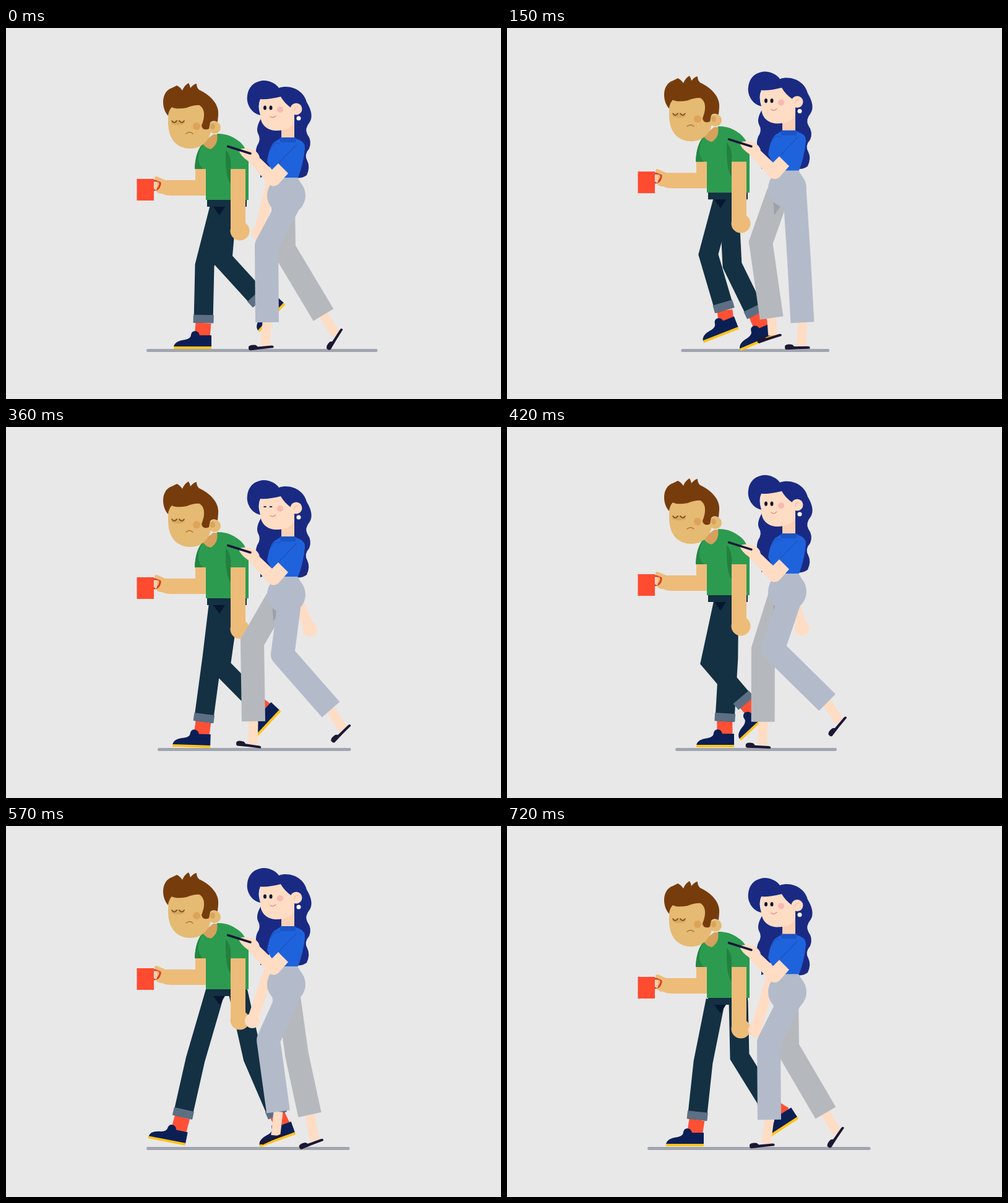
Animation of 800x600 px, one loop 0.75 s. Source, as an HTML page with a canvas:

```html
<!DOCTYPE html>
<html lang="en">
<head>
<meta charset="utf-8">
<title>Walking couple</title>
<style>
html, body { margin: 0; width: 100%; height: 100%; overflow: hidden; background: #e8e8e8; }
canvas { display: block; }
</style>
</head>
<body>
<canvas id="stage" width="800" height="600"></canvas>
<script>
const ctx = document.getElementById('stage').getContext('2d');
const LOOP = 750, STEP = 30;
const TIMES = [0, 60, 120, 240, 360, 480, 570, 720];

// Body tracks, one row per key time: man bob, woman bob, hair bob, ground left, ground right, hand x, hand y
const body = [
  [0, 0, 0, 228, 600, 409, 331],
  [-8, -8, -11, 241, 570, 428, 326],
  [-12, -11.5, -15, 290, 515, 455, 322],
  [-10, -11, -10, 241, 553, 492, 315],
  [-1, 0, 1, 246, 557, 491, 327],
  [-12, -11.5, -16, 298, 508, 450, 322],
  [-14, -15, -17, 228, 555, 398, 315],
  [0, -2.5, -1, 228, 587, 402, 330]
];

// Leg tracks: hip x, knee x, knee y, cuff x, cuff y, sole x, sole y, foot angle
const manNear = [
  [347, 321, 384, 319, 477, 302, 519, 0],
  [343, 350, 385, 370, 470, 365, 516, -14],
  [355, 360, 384, 391, 467, 391, 513, -19],
  [364, 372, 383, 431, 450, 442, 497, -38],
  [362, 347, 387, 405, 446, 424, 482, -47],
  [340, 314, 371, 361, 449, 364, 494, -33],
  [338, 306, 378, 285, 471, 260, 511, 11],
  [337, 317, 382, 307, 475, 288, 518, 0]
];
const manFar = [
  [358, 350, 374, 411, 441, 431, 469, -47],
  [361, 357, 376, 402, 438, 410, 476, -35],
  [352, 330, 366, 370, 450, 370, 491, -28],
  [349, 318, 368, 310, 473, 293, 514, 0],
  [344, 333, 373, 319, 477, 300, 518, 2],
  [374, 384, 374, 397, 474, 390, 518, -5],
  [375, 399, 375, 439, 468, 440, 509, -20],
  [374, 376, 373, 425, 452, 446, 490, -33]
];
const womanNear = [
  [461, 421, 352, 422, 476, 412, 516, -5],
  [462, 449, 375, 447, 477, 434, 516, -2],
  [464, 464, 375, 465, 477, 455, 516, 0],
  [467, 490, 378, 513, 470, 513, 515, -8],
  [459, 447, 368, 525, 457, 541, 495, -44],
  [460, 421, 351, 501, 438, 517, 477, -52],
  [462, 424, 346, 440, 462, 430, 505, -22],
  [461, 423, 350, 424, 475, 412, 516, -5]
];
const womanFar = [
  [448, 449, 357, 513, 464, 531, 503, -57],
  [445, 421, 350, 482, 461, 490, 502, -52],
  [440, 410, 348, 440, 468, 441, 500, -30],
  [437, 411, 345, 404, 471, 390, 508, 15],
  [439, 398, 348, 400, 476, 392, 514, 8],
  [445, 440, 370, 440, 477, 432, 517, -2],
  [455, 470, 370, 491, 467, 493, 513, -20],
  [452, 453, 358, 515, 464, 531, 503, -55]
];

// Cyclic monotone cubic interpolation of every column
function pose(rows, t) {
  const n = rows.length;
  const row = i => rows[(i + n) % n];
  const time = i => TIMES[(i + n) % n] + Math.floor(i / n) * LOOP;
  let k = n - 1;
  while (TIMES[k] > t) k--;
  const span = time(k + 1) - time(k), u = (t - time(k)) / span;
  return row(k).map((a, c) => {
    const slope = i => (row(i + 1)[c] - row(i)[c]) / (time(i + 1) - time(i));
    const tangent = i => {
      const p = slope(i - 1), q = slope(i);
      return p * q > 0 ? 2 * p * q / (p + q) : 0;
    };
    const b = row(k + 1)[c], m = tangent(k) * span, w = tangent(k + 1) * span;
    return a + u * (m + u * (3 * (b - a) - 2 * m - w + u * (2 * (a - b) + m + w)));
  });
}

function fill(color, d) {
  ctx.fillStyle = color;
  ctx.fill(new Path2D(d));
}
function stroke(color, width, d, cap = 'butt', join = 'miter') {
  ctx.strokeStyle = color;
  ctx.lineWidth = width;
  ctx.lineCap = cap;
  ctx.lineJoin = join;
  ctx.stroke(new Path2D(d));
}
function oval(color, x, y, rx, ry = rx) {
  ctx.fillStyle = color;
  ctx.beginPath();
  ctx.ellipse(x, y, rx, ry, 0, 0, 7);
  ctx.fill();
}
function shifted(dy, draw) {
  ctx.save();
  ctx.translate(0, dy);
  draw();
  ctx.restore();
}
function placed(x, y, degrees, draw) {
  ctx.save();
  ctx.translate(x, y);
  ctx.rotate(degrees * Math.PI / 180);
  draw();
  ctx.restore();
}
// Turns an offset in the foot's own axes into stage coordinates
function footPoint(x, y, degrees, dx, dy) {
  const a = degrees * Math.PI / 180, c = Math.cos(a), s = Math.sin(a);
  return `${x + dx * c - dy * s} ${y + dx * s + dy * c}`;
}

function manLeg(rows, t, bob) {
  const [hx, kx, ky, cx, cy, sx, sy, angle] = pose(rows, t);
  const len = Math.hypot(cx - kx, cy - ky), f = 13 / len;
  stroke('#ff5035', 25, `M${cx} ${cy}L${footPoint(sx, sy, angle, 15, -18)}`);
  placed(sx, sy, angle, () => {
    fill('#0b1f55', 'M-31 -3Q-30 -13 -12 -15Q-3 -17 -3 -23Q-2 -29 4 -29Q10 -28 11 -22H30V-3Z');
    fill('#ffc31c', 'M-31 -4H30V0H-31Z');
  });
  stroke('#143043', 31, `M${hx} ${282 + bob}L${kx} ${ky}L${cx} ${cy}`);
  stroke('#5d6f84', 33, `M${cx - (cx - kx) * f} ${cy - (cy - ky) * f}L${cx} ${cy}`);
}

function womanLeg(rows, t, bob, color, join) {
  const [hx, kx, ky, cx, cy, sx, sy, angle] = pose(rows, t);
  stroke('#ffdcc4', 15, `M${cx} ${cy}L${footPoint(sx, sy, angle, 7, -2)}`);
  placed(sx, sy, angle, () =>
    fill('#1d1733', 'M-20 2V-2Q-17 -6 -8 -4L-5 -1H17Q22 -1 20 3Q0 3 -18 4Z'));
  stroke(color, 38, `M${hx} ${277 + bob}L${kx} ${ky}L${cx} ${cy}`, 'butt', join);
}

function man(t, bob) {
  const skin = '#edbc79', face = '#e5ba73', line = '#6f4a1d';
  manLeg(manFar, t, bob);
  manLeg(manNear, t, bob);
  shifted(bob, () => {
    fill('#143043', 'M325 275H389V289H325Z');
    fill('#07172f', 'M335 289H354L345 303Z');

    // Cup arm
    fill(skin, 'M306 226H324V271H268Q250 271 249 262L252 246H306Z');
    oval(skin, 251, 256, 11, 12);
    fill('#ff4b2f', 'M211.5 244H239V279H211.5Z');
    stroke('#d93a25', 3, 'M239 247H243Q250 247 249 253Q247 262 239 262');
    stroke('#f6cfa0', 4, 'M242 251V260', 'round');
    stroke(skin, 6, 'M243 243L250 246', 'round');

    // Neck, shirt and near arm
    fill('#d5a15c', 'M314 188L335 172L345 172Q346 200 328 199Z');
    fill('#2c9b4f', 'M318 187Q306 200 305 228H323V278H392V213Q390 196 380 186Q362 170 341 171Q344 188 331 196Q322 194 318 187Z');
    fill('#248543', 'M318 187Q306 200 305 228H318Q306 215 314 196Z');
    fill('#23803f', 'M355 197Q365 207 363 228V252Q354 242 355 197Z');
    fill(skin, 'M363 228H387V326H363Z');
    oval(skin, 378, 328, 15.5);

    // Head
    fill(face, 'M264 126Q262 135 262 152C262 182 278 195 298 195C318 195 330 180 332 162L325 122L270 122Z');
    oval(face, 337, 161, 10);
    oval('#d9a45d', 334, 159, 4, 5);
    oval('#dfa259', 308, 159, 6);
    oval('#d9a761', 278, 153, 11, 4);
    stroke(line, 1.6, 'M268 150Q272 156 276 150M280 150Q284 156 288 150', 'round');
    stroke('#a9743a', 1.4, 'M291 171Q297 166 302 171', 'round');
    fill('#773c0c', 'M262 142C251 130 250 103 268 97L276 93Q281 95 285 101Q288 93 295 89Q297 92 298 97Q304 90 308 90Q308 96 312 100C332 109 345 125 343 141L342 152Q334 148 330 153L328 163Q318 167 316 158C321 146 323 132 313 125Q305 124 292 129Q275 132 268 128Q263 133 262 142Z');
  });
}

function woman(t, bob, hairBob, handX, handY) {
  const skin = '#ffdcc4', hair = '#1a2a83', blue = '#1f63dc', near = '#b3bbca';
  shifted(hairBob, () => fill(hair,
    'M420 135Q402 158 407 170Q413 180 406 190Q400 205 411 218L411 242Q430 235 440 225L462 240Q475 246 486 238Q492 225 487 215Q481 205 490 195Q495 183 487 172Q482 163 491 152Q498 140 486 120Z'));
  stroke(skin, 17, `M440 ${205 + bob}L${handX} ${handY}`);
  oval(skin, handX, handY, 12);

  womanLeg(womanFar, t, bob, '#b5b9be', 'miter');
  shifted(bob, () => fill('rgba(115,120,128,.35)', 'M430 285H452L432 314Z'));
  womanLeg(womanNear, t, bob, near, 'round');
  shifted(bob, () => {
    oval(near, 453, 271, 31);
    fill(near, 'M434 240H470L482 260H424Z');

    // Neck, shirt and phone arm
    fill('#fbd0b5', 'M445 150H466V180H445Z');
    fill(blue, 'M444 178H467L476 182Q484 186 483 196Q480 222 472 242H436L422 216Q426 188 436 183Z');
    fill('#1b54c4', 'M443 177H468V185H443Z');
    stroke('#1b52bf', 1.2, 'M470 188L441 218M428 196Q434 182 443 188');
    fill(skin, 'M440 219L456 235L440 253Q432 259 424 252L391 215Q378 206 376 197Q385 192 400 197Q409 202 410 210L430 229Z');
    stroke('#15173a', 3.5, 'M358.5 191.5L395 203', 'round');

    // Face
    fill(skin, 'M411 112L445 106Q452 122 466 124V150Q462 166 436 166C420 165 411 155 411 140Z');
    oval('#f9b9b3', 443, 132, 5);
    const lid = Math.abs(t - 360) < 45 ? 1 : 3.6;
    oval('#101634', 418.5, 129, 2.5, lid);
    oval('#101634', 428, 129, 2.5, lid);
    stroke('#e58d7c', 1.3, 'M427 143Q431 147 436 142', 'round');
  });
  shifted(hairBob, () => fill(hair,
    'M411 141C396 138 388 122 390 110C392 92 405 85 418 85C430 86 438 92 441 97C460 90 486 102 487 127L474 140L462 130Q450 122 444 111Q425 116 411 115Q406 125 411 141Z'));
  shifted(bob, () => {
    oval(skin, 469, 131, 9.5);
    stroke('#f2b99d', 1.2, 'M466 133Q466 127 472 127', 'round');
    oval('#fff', 473, 146, 3.5);
  });
}

function draw(now) {
  const t = Math.floor(now % LOOP / STEP) * STEP;
  const [manBob, womanBob, hairBob, left, right, handX, handY] = pose(body, t);
  ctx.fillStyle = '#e8e8e8';
  ctx.fillRect(0, 0, 800, 600);
  stroke('#a0a5b0', 5, `M${left + 1.5} 521.5H${right - 2}`, 'round');
  man(t, manBob);
  woman(t, womanBob, hairBob, handX, handY);
}

const start = performance.now();
function tick() {
  draw(performance.now() - start);
  requestAnimationFrame(tick);
}
tick();
</script>
</body>
</html>
```
